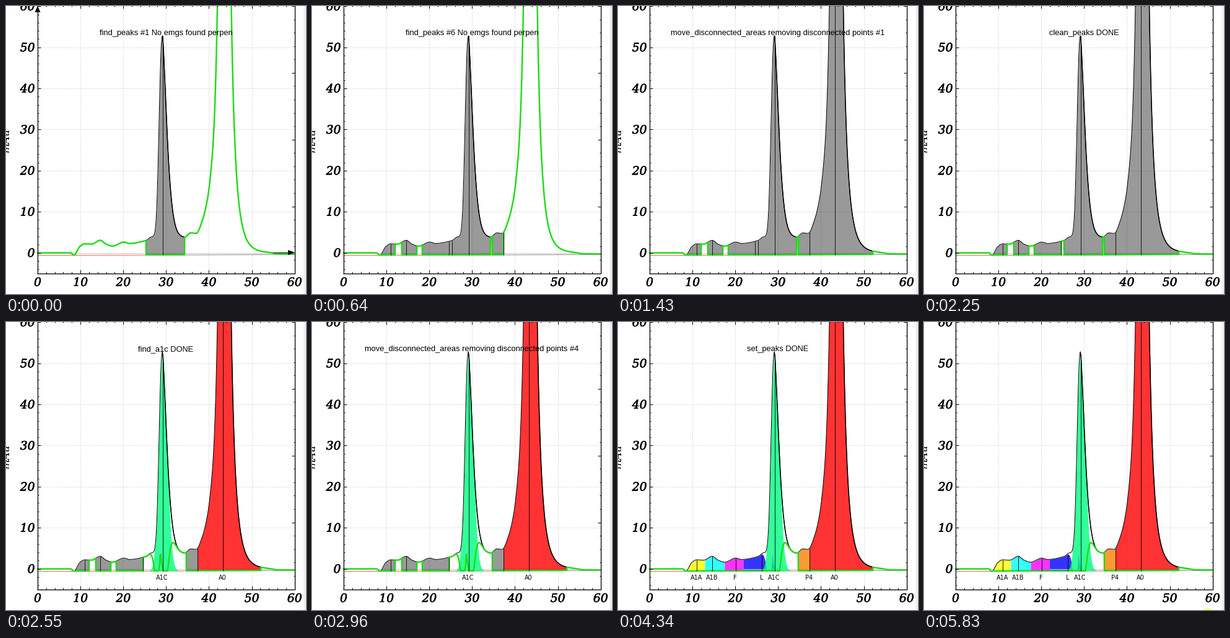
A matplotlib script for the animation above (5930 ms loop, 484 by 465 pixels).

```python
import numpy as np
import matplotlib.pyplot as plt
from matplotlib import patheffects
from matplotlib.animation import FuncAnimation
from matplotlib.collections import LineCollection

W, H, DPI = 484, 465, 100
LOOP, STEP = 5930, 10
PX = 72 / DPI  # points per pixel
X0, Y0, UX, UY = 51, 398.5, 6.91, 6.635
RIGHT, BOTTOM = 465.5, 431.5
GREEN = "#1cdc14"
GRAY = ("black", 0.4)

plt.rcParams["toolbar"] = "None"
fig = plt.figure(figsize=(W / DPI, H / DPI), dpi=DPI, facecolor="white")
ax = fig.add_axes([0, 0, 1, 1])
ax.set_xlim(0, W)
ax.set_ylim(H, 0)
ax.axis("off")


# --- signal: a wavy pedestal under two tall skewed peaks --------------------
def smooth(points, x):
    """Monotone cubic through the points, sampled at x."""
    px, py = np.array(points, float).T
    h = np.diff(px)
    s = np.diff(py) / h
    m = np.zeros_like(px)
    same = s[:-1] * s[1:] > 0
    a, b = s[:-1][same], s[1:][same]
    m[1:-1][same] = 2 * a * b / (a + b)
    k = np.clip(np.searchsorted(px, x, side="right") - 1, 0, len(h) - 1)
    u = (x - px[k]) / h[k]
    return (py[k] * (1 + 2 * u) * (1 - u) ** 2 + m[k] * h[k] * u * (1 - u) ** 2
            + py[k + 1] * u * u * (3 - 2 * u) + m[k + 1] * h[k] * u * u * (u - 1))


PEDESTAL = [(51, 4), (104, 4), (109.5, 0), (119, 14), (127, 18.4), (138, 17.8),
            (152, 24), (161, 18), (172, 14.5), (190, 21), (199, 18.7),
            (226, 23.5), (234, 29), (245, 30), (288, 28), (298, 35.3),
            (307, 34), (317, 52), (326, 75), (332, 89), (346, 90), (360, 3),
            (420, 2.5), (440, 0.7), (466, 0.7)]

x = np.arange(X0, 465.6, 0.25)
base = 402.6 - 1.4 * (x - X0) / 414

d = x - 252.5
tall = 324 * np.where(d < 0, np.exp(-(np.abs(d) / 7.1) ** 2.4),
                      np.exp(-(np.abs(d) / 10) ** 1.43))
rise = 312 * np.exp(0.18 * (np.minimum(x, 350) - 341))
tail = 15000 * np.exp(-0.834 * np.maximum(x - 350, 0) ** 0.565)
height = smooth(PEDESTAL, x) + tall + np.minimum(rise, tail)

# the symmetric part of the first tall peak, and what it leaves over
bell = np.minimum(height, 348 * np.exp(-(d / np.where(d < 0, 6, 7.2)) ** 2 / 2))
rest = height - bell + 20 * np.exp(-((x - 249) / 1.5) ** 2)


def inside(a, b):
    return (x >= a) & (x <= b)


# --- fixed chart ------------------------------------------------------------
def segments(segs, color="black", width=1.0, **kw):
    return ax.add_collection(LineCollection(segs, colors=color,
                                            linewidths=width * PX, **kw))


def ticks(start, step, count, line):
    """Every fifth tick is long."""
    segments([line(start + k * step, 2 if k % 5 else 5) for k in range(count)], zorder=6)


xs = [X0 + 10 * UX * k for k in range(7)]
ys = [Y0 - 10 * UY * k for k in range(7)]

ax.fill([480, W, W, 480], [0, 0, H, H], color="#f0f0f0", lw=0)
segments([[(a, 0), (a, BOTTOM)] for a in xs[1:-1]]
         + [[(X0, b), (RIGHT, b)] for b in ys[1:]],
         "#c0c0c0", linestyles=(0, (1, 2)))
segments([[(X0, Y0), (RIGHT, Y0)]], "#c8c8c8")
segments([[(X0, 402.6), (289, 402)]], "#ff5a5a", zorder=1.5)
segments([[(289, 402), (RIGHT, 401.2)]], "#8c8c8c", zorder=1.5)

ticks(X0, 2 * UX, 31, lambda a, n: [(a, BOTTOM), (a, BOTTOM - n - 1)])
ticks(X0, 2 * UX, 31, lambda a, n: [(a, -1), (a, n - 0.5)])
ticks(Y0 + 10 * UY, -2 * UY, 36, lambda b, n: [(X0, b), (X0 + n, b)] if b < BOTTOM
      else [(X0, BOTTOM)] * 2)
ticks(BOTTOM, -BOTTOM / 20, 21, lambda b, n: [(RIGHT, b), (RIGHT - n, b)])
segments([[(X0 - 0.5, 0), (X0 - 0.5, BOTTOM)], [(X0 - 1, BOTTOM), (RIGHT, BOTTOM)],
          [(RIGHT, 0), (RIGHT, BOTTOM)]], width=1.3, zorder=6)

serif = dict(family="DejaVu Serif", style="italic", va="baseline")
number = dict(serif, size=18.8 * PX,
              path_effects=[patheffects.withStroke(linewidth=0.6 * PX, foreground="black")])
for k in range(7):
    ax.text(46.5, ys[k] + 6.5, str(10 * k), ha="right", **number)
    ax.text(xs[k], 452, str(10 * k), ha="center", **number)
ax.text(4.5, 216, "mAu", rotation=90, rotation_mode="anchor", ha="center",
        size=17 * PX, **serif)


# --- peaks ------------------------------------------------------------------
class Peak:
    """A filled span with a line at its highest point, shown for a while."""

    def __init__(self, a, b, color, start, end=LOOP, label="", top=height, line=True, z=2):
        self.start, self.end = start, end
        self.mask = inside(a, b)
        self.clears = top is not bell
        px, low = x[self.mask], base[self.mask]
        y = low - top[self.mask]
        self.parts = [ax.fill_between(px, y, low, color=color, lw=0, zorder=z)]
        apex = px[np.argmin(y)]
        if line:
            self.parts.append(segments([[(apex, max(y.min(), -5)), (apex, 402)]],
                                       alpha=0.85, zorder=5))
        if label:
            self.parts.append(ax.text(apex - 0.7, 416, label, ha="center", va="baseline",
                                      family="DejaVu Sans", size=9.8 * PX))

    def show(self, t):
        on = self.start <= t < self.end
        for p in self.parts:
            p.set_visible(on)
        return on


A0, A1C, SPLIT, NAMED, LATE, P4, POINTER = 2400, 2550, 3420, 3830, 4010, 4240, 5830
find_times = [0, 100, 220, 340, 460, 640, 820]
found = [(226, 288, A1C), (291, 309, P4), (145, 169, SPLIT), (110, 134, SPLIT),
         (178, 221, SPLIT), (221, 226, 1660), (309, 411, A0)]

peaks = [Peak(a, b, GRAY, t, end) for (a, b, end), t in zip(found, find_times)]
peaks += [
    Peak(110, 226, GRAY, SPLIT, NAMED, line=False),
    Peak(202, 226, GRAY, NAMED, LATE, line=False),
    Peak(309, 411, ("red", 0.8), A0, label="A0"),
    Peak(230, 280, ("#00ff80", 0.8), A1C, label="A1C", top=bell),
    Peak(110, 140, ("yellow", 0.8), NAMED, label="A1A"),
    Peak(140, 172, ("cyan", 0.8), NAMED, label="A1B"),
    Peak(172, 202, ("magenta", 0.8), NAMED, label="F"),
    Peak(202, 256, ("blue", 0.8), LATE, label="L", top=rest, z=1.9),
    Peak(291, 309, ("#ff8000", 0.8), P4, label="P4"),
]

# thin slices cut before the first tall peak
rng = np.random.default_rng(4)
slices = [[(a, np.interp(a, x, base - height)), (a, 402)] for a in rng.uniform(122, 224, 18)]
first_cuts = segments(slices[::2], alpha=0.85, zorder=5)
more_cuts = segments(slices[1::2], alpha=0.85, zorder=5)

outline, = ax.plot([], [], color="black", lw=PX, zorder=3)
flank, = ax.plot([], [], color="black", lw=1.5 * PX, zorder=3)
trace, = ax.plot([], [], color=GREEN, lw=2.4 * PX, zorder=4, solid_joinstyle="round")
falling = inside(253, 288) | inside(362, 411)

arrows = [ax.fill([51, 46.5, 55.5], [0, 10, 10], color="black", lw=0, zorder=7)[0],
          ax.fill([466, 455, 455], [398, 394, 402], color="black", lw=0, zorder=7)[0],
          segments([[(430, 398), (464, 398)]], zorder=7)]
pointer = ax.add_patch(plt.Circle((458, 470), 8.5, color="#ffff80", lw=0, zorder=7))

# --- captions ---------------------------------------------------------------
FIND = "find_peaks #{} No emgs found perpen"
MOVE = "move_disconnected_areas removing disconnected points #{}"
CLEAN = "clean_peaks removing overlaps"


def moves(start, first, count):
    return [(start + 80 * n, MOVE.format(first + n)) for n in range(count)]


captions = [(t, FIND.format(n)) for n, t in enumerate(find_times, 1)]
captions += [(1020, "find_peaks DONE"), (1200, CLEAN)] + moves(1350, 0, 3)
captions += [(1660, CLEAN)] + moves(1750, 1, 6)
captions += [(2250, "clean_peaks DONE"), (A0, "find_a0 DONE"), (A1C, "find_a1c DONE")]
captions += moves(2720, 1, 5) + moves(3140, 6, 1)
captions += [(3240, CLEAN), (SPLIT, "split_pre_a1c removing"),
             (3650, "split_pre_a1c DONE"), (NAMED, "name_pre_a1c naming peaks"),
             (LATE, "name_pre_a1c A1A A1B F L P4"), (P4, "name_post_a1c P4"),
             (4340, "set_peaks DONE"), (4490, "")]
title = ax.text(258, 47, "", ha="center", va="baseline", zorder=8,
                family="Liberation Sans", size=12.93 * PX)


def update(i):
    t = i * STEP
    title.set_text([s for start, s in captions if start <= t][-1])

    parted = inside(226, 291) & (t >= A1C)
    left = np.where(parted, rest, height)
    covered = parted.copy()
    for p in peaks:
        if p.show(t):
            covered |= p.mask
            if p.clears:
                left[p.mask] = 0.3

    signal = np.where(covered, base - height, np.nan)
    trace.set_data(x, base - left)
    outline.set_data(x, signal)
    flank.set_data(x, np.where(falling, signal, np.nan))
    first_cuts.set_visible(SPLIT <= t < NAMED)
    more_cuts.set_visible(3650 <= t < NAMED)
    for a in arrows:
        a.set_visible(t < find_times[1])
    pointer.set_visible(t >= POINTER)
    return []


anim = FuncAnimation(fig, update, frames=LOOP // STEP, interval=STEP,
                     init_func=lambda: update(0), repeat=True, repeat_delay=0,
                     blit=False)
plt.show()
```
